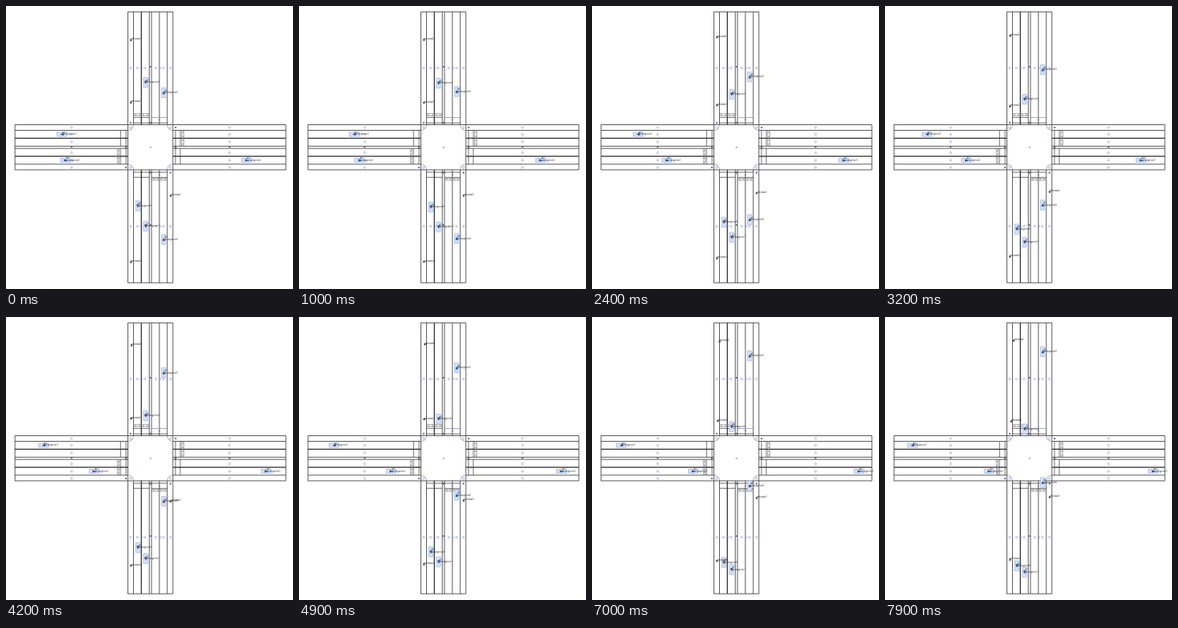
A matplotlib script for the animation above (8000 ms loop, 359 by 354 pixels).

```python
import numpy as np
import matplotlib.pyplot as plt
from matplotlib.animation import FuncAnimation
from matplotlib.patches import Arc, Circle, Polygon, Rectangle

W, H = 359, 354
FRAMES, STEP = 80, 100
START = 0.9  # seconds before traffic begins to move
INK, GREY, NAVY, BLUE = "#333333", "#777777", "#2c4184", "#808ce0"

# 72 dpi makes one point equal one pixel
fig = plt.figure(figsize=((W + 1e-6) / 72, (H + 1e-6) / 72), dpi=72, facecolor="white")
ax = fig.add_axes([0, 0, 1, 1])
ax.set_xlim(0, W)
ax.set_ylim(H, 0)
ax.axis("off")

# Road geometry: walkway, two lanes, median, two lanes, walkway
CX, CY, M = 180.6, 176.7, 3.53
LANES = np.array([-8, -6, -3.2, -0.4, 0.4, 3.2, 6, 8]) * M
XS, YS = CX + LANES, CY + LANES
LEFT, RIGHT, TOP, BOTTOM = XS[0], XS[-1], YS[0], YS[-1]
WEST, EAST, NORTH, SOUTH = CX - 48 * M, CX + 48 * M, CY - 48 * M, CY + 48 * M


def line(x0, y0, x1, y1, w=0.8, c=INK):
    ax.plot([x0, x1], [y0, y1], color=c, lw=w, solid_capstyle="butt", snap=False, zorder=2)


def ring(x, y, r=1.1, c=BLUE, w=0.5):
    ax.add_patch(Circle((x, y), r, fill=False, ec=c, lw=w, zorder=3))


def dot(x, y, r=0.9):
    ax.add_patch(Circle((x, y), r, fc="#6a6a80", ec="#444455", lw=0.3, zorder=3))


def box(x, y, w, h, n=4):
    ax.add_patch(Rectangle((x, y), w, h, fill=False, ec=GREY, lw=0.6, snap=False, zorder=2))
    for k in (np.arange(n) + 0.5) / n:
        if w > h:
            ring(x + w * k, y + h / 2, 0.7, GREY, 0.4)
        else:
            ring(x + w / 2, y + h * k, 0.7, GREY, 0.4)


def draw_roads():
    for i, (x, y) in enumerate(zip(XS, YS)):
        wx = 1.3 if i == 2 else 0.8
        wy = 1.3 if i in (2, 5) else 0.8
        line(x, NORTH, x, TOP, wx)
        line(x, BOTTOM, x, SOUTH, wx)
        line(WEST, y, LEFT, y, wy)
        line(RIGHT, y, EAST, y, wy)
    for y in (NORTH, SOUTH, TOP, BOTTOM):
        line(LEFT, y, RIGHT, y)
    for x in (WEST, EAST, LEFT, RIGHT):
        line(x, TOP, x, BOTTOM)
    corners = [(LEFT, TOP, 0), (RIGHT, TOP, 90), (RIGHT, BOTTOM, 180), (LEFT, BOTTOM, 270)]
    for x, y, a in corners:
        ax.add_patch(Arc((x, y), 4 * M, 4 * M, theta1=a, theta2=a + 90,
                         ec="#7f86ac", lw=0.6, zorder=2))


def draw_stops():
    x1, x3, x4, x6 = XS[[1, 3, 4, 6]]
    y1, y3, y4, y6 = YS[[1, 3, 4, 6]]
    line(x1, 146.2, x6, 146.2, 0.7)
    line(x4, 139.3, x6, 139.3, 0.6, "#7078a8")
    line(x1, 139.3, x3, 139.3, 0.6)
    box(x1 + 0.5, 134.8, 19, 2.5)
    line(x1, 208, x6, 208, 0.7)
    line(x1, 214.2, x3, 214.2, 0.7)
    line(x4, 214.2, x6, 214.2, 0.6)
    box(x4 + 0.5, 215.5, 19, 2.5)
    line(150.1, y1, 150.1, y6, 0.7)
    line(143.2, y1, 143.2, y3, 0.7)
    line(143.2, y4, 143.2, y6, 0.6)
    box(139.2, y4 + 0.5, 2.5, 19)
    line(212, y1, 212, y6, 0.7)
    line(218, y4, 218, y6, 0.7)
    line(218, y1, 218, y3, 0.6)
    box(219.8, y1 + 0.5, 2.5, 19)


def draw_nodes():
    for off in (3.5, 12, 17, 21.5, 35, 40, 44.5, 53.5):
        for y in (77.5, 275.5):
            ring(LEFT + off, y)
        if off not in (17, 40):
            for x in (82.1, 279.6):
                ring(x, TOP + off)
    for x in (155.8, 205.8):
        for y in (152, 202):
            ring(x, y, 1.2)
    ring(180.8, 176.8, 0.9, "#888888")
    for x, y in [(180.8, 76), (180.8, 274), (82.1, 176.3), (279.6, 176.3),
                 (156, 146), (180.8, 146), (180.8, 208.5), (205.8, 208.5),
                 (212.2, 152), (212.2, 177), (150, 177), (150, 202)]:
        dot(x, y)
    for x, y in zip(XS[[2, 5]], YS[[2, 5]]):
        dot(x, 142.3, 0.5)
        dot(x, 211.3, 0.5)
        dot(146.3, y, 0.5)
        dot(215.3, y, 0.5)


def ease(reach, tau):
    """Displacement that slows down exponentially after the start."""
    return lambda t: reach * (1 - np.exp(-max(t - START, 0) / tau))


def keyed(times, values):
    """Cubic Hermite curve through a few points."""
    slopes = np.gradient(values, times)

    def at(t):
        if t <= times[0]:
            return values[0]
        i = min(np.searchsorted(times, t) - 1, len(times) - 2)
        h = times[i + 1] - times[i]
        u = (t - times[i]) / h
        return ((1 + 2 * u) * (1 - u) ** 2 * values[i] + u * (1 - u) ** 2 * h * slopes[i]
                + u * u * (3 - 2 * u) * values[i + 1] + u * u * (u - 1) * h * slopes[i + 1])
    return at


def label(text, size):
    return ax.text(0, 0, text, size=size, color="#222222", va="center",
                   family="Liberation Sans", alpha=0.9, zorder=6)


class Car:
    def __init__(self, n, x, y, dx, dy, dist):
        self.start, self.way, self.dist = np.array([x, y]), np.array([dx, dy]), dist
        self.size = np.array([12.4, 5.2] if dx else [5.2, 12.4])
        self.body = ax.add_patch(Rectangle((0, 0), *self.size, fc="#d3e2f8", ec="#9ab8ea",
                                           lw=0.7, snap=False, zorder=4))
        self.mark = ax.add_patch(Polygon(np.zeros((3, 2)), fc=NAVY, ec=NAVY, lw=0.2, zorder=5))
        self.tag = label(f"car{n}", 2.5)
        self.kind = label(f"passengercar{n}", 2.7)

    def move(self, t):
        p = self.start + self.way * self.dist(t)
        side = self.way[::-1]
        self.body.set_xy(p - self.size / 2)
        self.mark.set_xy([p + 1.9 * self.way, p - 1.7 * self.way + 1.4 * side,
                          p - 1.7 * self.way - 1.4 * side])
        self.tag.set_position((p[0] + 0.3, p[1] - 2.6))
        self.kind.set_position((p[0] + 0.4, p[1] - 0.2))


class Walker:
    def __init__(self, n, x, y, dy, dist, drift=0):
        self.x, self.y, self.dy, self.dist, self.drift = x, y, dy, dist, drift
        self.mark = ax.add_patch(Circle((x, y), 1, fc="#555566", ec=INK, lw=0.4, zorder=5))
        self.name = label(f"pedestrian{n}", 2.6)

    def move(self, t):
        x = self.x + self.drift * (max(t - START, 0) / 7) ** 2.5
        y = self.y + self.dy * self.dist(t)
        self.mark.center = x, y
        self.name.set_position((x - 0.4, y - 1.4))


draw_roads()
draw_stops()
draw_nodes()

braking = keyed([0.9, 1.6, 3.2, 4.2, 4.9, 6.1, 7.9], [0, 8.5, 43, 61.5, 69, 76.5, 85])
actors = [
    Car(1, 70, 160.5, -1, 0, ease(47.5, 5)),
    Car(2, 74.5, 193, 1, 0, ease(74, 5)),
    Car(3, 301, 193, 1, 0, ease(40, 3.5)),
    Car(4, 174.5, 95.5, 0, 1, ease(62, 5.5)),
    Car(5, 197.2, 108.5, 0, -1, ease(103, 7)),
    Car(6, 164.8, 250, 0, 1, ease(85, 5.5)),
    Car(7, 174.5, 275.3, 0, 1, ease(63.5, 6)),
    Car(8, 197.2, 292, 0, -1, braking),
    Walker(1, 156.3, 42.7, -1, ease(26, 10), 4.7),
    Walker(2, 156.3, 120.8, 1, ease(13, 5), 1.5),
    Walker(3, 206, 237.5, -1, ease(24, 10)),
    Walker(4, 156.3, 320.3, -1, ease(33, 10)),
]


def update(i):
    for actor in actors:
        actor.move(i * STEP / 1000)
    return []


anim = FuncAnimation(fig, update, frames=FRAMES, interval=STEP, repeat=True, repeat_delay=0)
plt.show()
```
